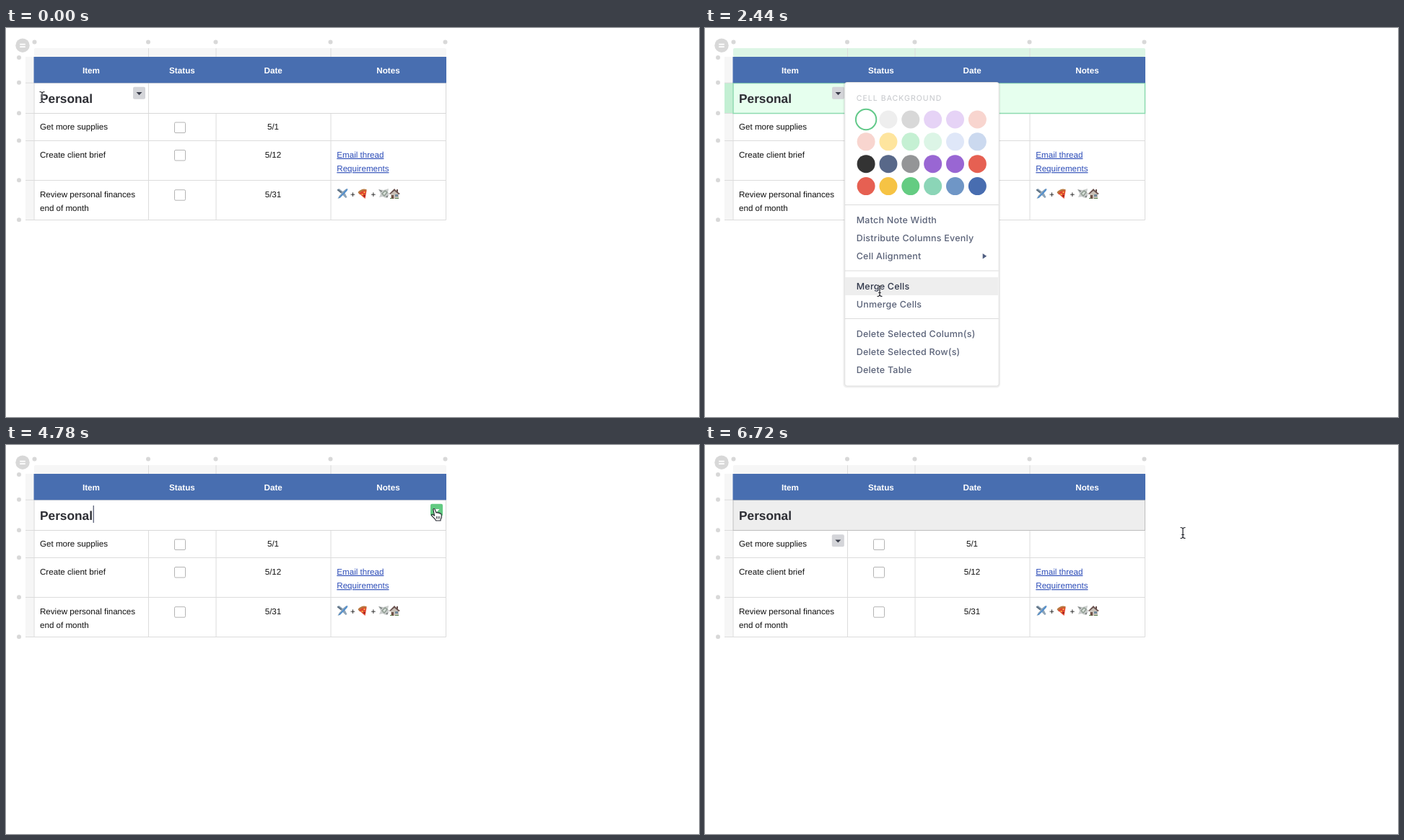
Write an HTML page that moves like this. It is 960 px wide and 540 px high and loops after 6.74 s.

```html
<!DOCTYPE html>
<html lang="en">
<head>
<meta charset="utf-8">
<title>Merging table cells</title>
<style>
  html, body { margin: 0; width: 100%; height: 100%; overflow: hidden; background: #fff; }
  svg { display: block; width: 960px; height: 540px; text-rendering: geometricPrecision; }
  .cell { font: 11.6px "Liberation Sans", Arial, sans-serif; fill: #111; }
  .head { font: bold 11.7px "Liberation Sans", Arial, sans-serif; fill: #fff; }
  .title { font: bold 17.3px "Liberation Sans", Arial, sans-serif; fill: #2d2e34; }
  .mid { text-anchor: middle; }
  .link { fill: #2d4db8; text-decoration: underline; }
  .item { font: 500 12.5px Inter, sans-serif; letter-spacing: .22px; fill: #5a6278; }
  .item.on { fill: #30374a; }
  .label { font: 400 10.5px Inter, sans-serif; letter-spacing: 1.05px; fill: #c3c5c9; }
  .dot { fill: #d8d8d8; }
  .line { stroke: #dcdcdc; fill: none; }
</style>
</head>
<body>
<svg id="stage" viewBox="0 0 960 540" xmlns="http://www.w3.org/2000/svg"></svg>
<script>
const LOOP = 6740;
const COLS = [39, 197.5, 291, 450, 609.5];
const ROWS = [118.5, 156.5, 211.5, 266.5];
const GROWTH = 19.5;

const AT = {
  select: 460, menuA: 1560, merge: 2560, clear: 3000,
  hide: 3440, show: 4120, shrink: 3960,
  menuB: 4920, paint: 5820, leave: 6260
};

// time, x, y
const PATH = [
  [0, 50, 96], [240, 55, 96], [480, 204, 97], [600, 232, 98], [760, 232, 98],
  [1040, 163, 96], [1240, 184, 92], [1680, 184, 92], [2240, 240, 361],
  [2420, 242, 365], [2560, 242, 365], [2720, 216, 258], [2960, 135, 108],
  [4120, 135, 108], [4600, 593, 90], [5080, 593, 90], [5680, 656, 126],
  [5740, 661, 127], [5880, 661, 127], [6240, 150, 136], [6340, 150, 136],
  [6660, 662, 122], [LOOP, 662, 122]
];

const SWATCHES = [
  "#ffffff #eeeeee #d8d8d8 #e6d3f6 #e6d3f6 #f8d5cf",
  "#f8d5cf #fee59e #c5f0d3 #dcf5e6 #dfe7f8 #cbd9ef",
  "#333333 #586889 #949597 #9966d3 #9966d3 #e66052",
  "#e66052 #f6c344 #64cc82 #8bd5b7 #6f96c6 #486db0"
].map(row => row.split(" "));

const DELETES = ["Delete Selected Column(s)", "Delete Selected Row(s)", "Delete Table"];

const text = (x, y, s, cls = "cell") => `<text x="${x}" y="${y}" class="${cls}">${s}</text>`;
const line = (x1, y1, x2, y2) => `<path class="line" d="M${x1} ${y1}L${x2} ${y2}"/>`;
const rect = (x, y, w, h, extra = "") =>
  `<rect x="${x}" y="${y}" width="${w}" height="${h}" ${extra}/>`;
const dot = (x, y) => `<circle class="dot" cx="${x}" cy="${y}" r="3"/>`;
const shape = (d, fill) => `<path d="${d}" fill="${fill}"/>`;

function icons() {
  const plane = shape("M0 1L3 0 8 4 13 0 15 1 11 6 14 12 12 13 8 9 4 13 1 14 3 10 6 7z", "#8fa5b8")
    + shape("M2 13L13 1 15 0 14 3 4 13z", "#4f8fd0") + shape("M0 2L2 1 7 5 5 6z", "#5c6f80");
  const pizza = shape("M0 5Q5 -1 12 1L12 3Q6 3 2 8z", "#b9773f")
    + shape("M2 7Q6 2 12 3L10 14z", "#e0442e")
    + shape("M5 7h2v2h-2zM8 4h2v2h-2z", "#f3b54a") + shape("M8 9h2v2h-2z", "#8b251c");
  const cash = shape("M0 1L7 2 14 0 13 5 15 7 10 13 6 11 1 12 3 7z", "#c9cccb")
    + shape("M4 7L9 2 13 5 8 11z", "#8d9a90") + shape("M6 7L9 4 11 5 8 9z", "#d9e1da")
    + shape("M0 1L5 3 4 5zM10 11L14 9 12 13z", "#777c7c");
  const house = shape("M2 6L7 1 13 6V14H2z", "#c9c1b8")
    + shape("M0 7L7 0 10 3V1H12V5L15 7 13 8 7 3 1 8z", "#6b5350")
    + shape("M3 9h3v5h-3z", "#6f5147") + shape("M8 8h4v3h-4z", "#71899b")
    + shape("M1 13h3v1h-3zM8 13h5v1h-5z", "#56804c");
  const place = (x, art) => `<g transform="translate(${x} 223)">${art}</g>`;
  return place(458.5, plane) + place(487.5, pizza) + place(516, cash) + place(531, house)
    + text(480.5, 235, "+", "cell mid") + text(509, 235, "+", "cell mid");
}

function tableBody() {
  let s = rect(27, 118.5, 11.5, 148, 'fill="#f6f6f6"');
  ROWS.forEach(y => s += line(27, y, 609.5, y) + dot(18, y - .3));
  COLS.forEach(x => s += line(x, 118.5, x, 266.5));
  [["Get more supplies", 141.3, "5/1"], ["Create client brief", 179.8, "5/12"],
   ["Review personal finances", 235, "5/31"]].forEach(([name, y, date]) => {
    s += text(47, y, name) + text(370, y, date, "cell mid")
      + rect(233.5, y - 10.3, 15, 14.5, 'rx="1.5" fill="#fff" stroke="#b4b4b4"');
  });
  return s + text(47, 254.3, "end of month")
    + text(458.3, 179.8, "Email thread", "cell link")
    + text(458.3, 199.2, "Requirements", "cell link") + icons();
}

function menu(id, x, groups) {
  let y = 267, list = "";
  groups.forEach((group, i) => {
    if (i) y += 16.5;
    list += line(x, y - 21.5, x + 213, y - 21.5);
    group.forEach(name => {
      list += rect(x + .5, y - 12.5, 212, 25, `class="hover" data-y="${y}" fill="#eee"`)
        + text(x + 16, y + 4.4, name, "item");
      if (name === "Cell Alignment") list += shape(`M${x + 191} ${y - 4}l5.5 3.7 -5.5 3.7z`, "#4f5d80");
      y += 25;
    });
  });
  const bottom = y - 3;
  let s = rect(x - 1, 75, 215, bottom - 74, 'rx="4" fill="none" stroke="#000" stroke-opacity=".06" stroke-width="3"')
    + rect(x, 75.5, 213.5, bottom - 75.5, 'rx="3" fill="#fff" stroke="#dedede"')
    + text(x + 16, 100.8, "CELL BACKGROUND", "label");
  SWATCHES.forEach((row, j) => row.forEach((color, i) => {
    const cx = x + 29.4 + i * 30.85, cy = 127 + j * 30.85;
    const first = i + j === 0;
    s += `<circle cx="${cx}" cy="${cy}" r="12.5" fill="${color}"/>`
      + `<circle class="${first ? "" : "ring"}" data-x="${cx}" data-y="${cy}" cx="${cx}" cy="${cy}" r="14.2"
          fill="none" stroke="${first ? "#63c98a" : "#a5dfbb"}" stroke-width="${first ? 2 : 1.5}"/>`;
  }));
  return `<g id="${id}">${s}${list}</g>`;
}

function cursors() {
  const beam = "M-3.5 -7.5Q0 -7.5 0 -5Q0 -7.5 3.5 -7.5M0 -5V5M-3.5 7.5Q0 7.5 0 5Q0 7.5 3.5 7.5M-1.8 2.5H1.8";
  const hand = "M-1 0Q-1.5 -1.5 0 -1.5Q1 -1.5 1.5 0L3 4Q4.5 3 5.5 4.3Q7 3.6 7.8 5Q9.5 4.6 10 6.3"
    + "L10.5 10Q10.3 12 9 13.5V15H2.5L1.5 13 -3 8.5Q-4.3 6.5 -2.5 6.3L0.5 8z";
  return `<g id="beam" fill="none"><path d="${beam}" stroke="#fff" stroke-width="2.6" opacity=".8"/>
      <path d="${beam}" stroke="#1d1f26" stroke-width="1.2"/></g>
    <g id="hand"><path d="${hand}" fill="#fff" stroke="#20232c" stroke-width="1.1"/>
      <path d="M3.5 9V12.5M5.7 9V12.5M7.9 9V12.5" stroke="#20232c" stroke-width=".9"/></g>`;
}

const stage = document.getElementById("stage");
stage.innerHTML =
  rect(39, 28, 571, 12, 'id="topBar" rx="2"')
  + COLS.slice(1, 4).map(x => line(x, 28, x, 40)).join("")
  + rect(27, 40, 11.5, 36, 'fill="#f6f6f6"')
  + rect(27, 76, 11.5, 42, 'id="sideBar"') + line(27, 76.2, 39, 76.2)
  + [39.5, 197, 290.5, 449.5, 608.5].map(x => dot(x, 19.6)).join("")
  + dot(18, 41) + dot(18, 75.7)
  + '<circle class="dot" cx="23" cy="24.2" r="9.7"/>'
  + '<path d="M19.2 22.7h7.6M19.2 26.2h7.6" stroke="#fff" stroke-width="1.8"/>'
  + `<g id="body">${tableBody()}</g>`
  + rect(39, 76.5, 570.5, 42, 'id="row"')
  + '<path id="split" class="line" d="M197.5 77V118"/>'
  + rect(38.5, 40, 571.5, 36.3, 'fill="#486eb0"')
  + ["Item", "Status", "Date", "Notes"].map((s, i) =>
      text((COLS[i] + COLS[i + 1]) / 2 - .3, 63, s, "head mid")).join("")
  + text(47, 103.6, "Personal", "title")
  + rect(0, 0, 1.3, 24, 'id="caret" fill="#596078"')
  + `<g id="button">${rect(-8.5, -8.5, 17, 17, 'id="face" rx="2"')}<path id="arrow" d="M-4 -1.3H4L0 2.9z"/></g>`
  + menu("menuA", 193.7, [["Match Note Width", "Distribute Columns Evenly", "Cell Alignment"],
      ["Merge Cells", "Unmerge Cells"], DELETES])
  + menu("menuB", 605.7, [["Match Note Width", "Cell Alignment"], ["Unmerge Cells"], DELETES])
  + cursors();

const el = {};
stage.querySelectorAll("[id]").forEach(n => el[n.id] = n);
const set = (node, attrs) => { for (const k in attrs) node.setAttribute(k, attrs[k]); };
const show = (node, on) => node.setAttribute("visibility", on ? "visible" : "hidden");
const move = (node, x, y) => node.setAttribute("transform", `translate(${x} ${y})`);
const within = (t, from, to) => t >= from && t < to;

function pointer(t) {
  const i = Math.max(1, PATH.findIndex(p => p[0] > t));
  const [t0, x0, y0] = PATH[i - 1], [t1, x1, y1] = PATH[i];
  const u = (t - t0) / (t1 - t0), k = u * u * (3 - 2 * u);
  return [x0 + (x1 - x0) * k, y0 + (y1 - y0) * k];
}

function drawMenu(node, left, open, x, y) {
  node.style.display = open ? "" : "none";
  if (!open) return;
  const inside = x > left && x < left + 213;
  node.querySelectorAll(".hover").forEach(h => {
    const on = inside && Math.abs(y - h.dataset.y) < 12.5;
    show(h, on);
    h.nextSibling.classList.toggle("on", on);
  });
  node.querySelectorAll(".ring").forEach(r =>
    show(r, Math.hypot(x - r.dataset.x, y - r.dataset.y) < 13));
}

function draw(t) {
  const [x, y] = pointer(t);
  const selected = within(t, AT.select, AT.clear);
  const tall = within(t, AT.merge, AT.shrink);
  const painted = t >= AT.paint;
  const height = 42 + (tall ? GROWTH : 0);
  const openA = within(t, AT.menuA, AT.merge), openB = within(t, AT.menuB, AT.paint);

  set(el.topBar, { fill: selected ? "#dcf5e5" : "#f6f6f6" });
  set(el.sideBar, { fill: selected ? "#c3efd3" : "#f6f6f6", height });
  set(el.row, {
    height,
    fill: selected ? "#e6ffee" : painted ? "#eeeeee" : "#ffffff",
    stroke: selected ? "#8ddab0" : painted ? "#bdbdbd" : "#d8d8d8",
    "stroke-width": selected ? 1.5 : 1
  });
  show(el.split, t < AT.merge);
  move(el.body, 0, tall ? GROWTH : 0);

  const [bx, by] = t < AT.merge ? [184.5, 90.3] : t < AT.leave ? [596.5, 90.3] : [184.3, 132.7];
  const hidden = within(t, AT.hide, AT.show);
  const over = !hidden && Math.abs(x - bx) < 8.5 && Math.abs(y - by) < 8.5;
  move(el.button, bx, by);
  set(el.face, { fill: over ? "#62ca82" : "#d4d5d9" });
  set(el.arrow, { fill: over ? "#ffffff" : "#3b3f4c" });

  const blink = ((t - 4620) % 640 + 640) % 640 < 320;
  show(el.caret, within(t, AT.clear, AT.menuB) && blink);
  set(el.caret, tall ? { x: 47, y: 107 } : { x: 120.6, y: 84 });

  drawMenu(el.menuA, 193.7, openA, x, y);
  drawMenu(el.menuB, 605.7, openB, x, y);

  move(el.beam, x, y);
  move(el.hand, x, y);
  show(el.beam, !hidden && !over);
  show(el.hand, over);
}

const start = performance.now();
function tick() {
  draw((performance.now() - start) % LOOP);
  requestAnimationFrame(tick);
}
tick();
</script>
</body>
</html>
```
